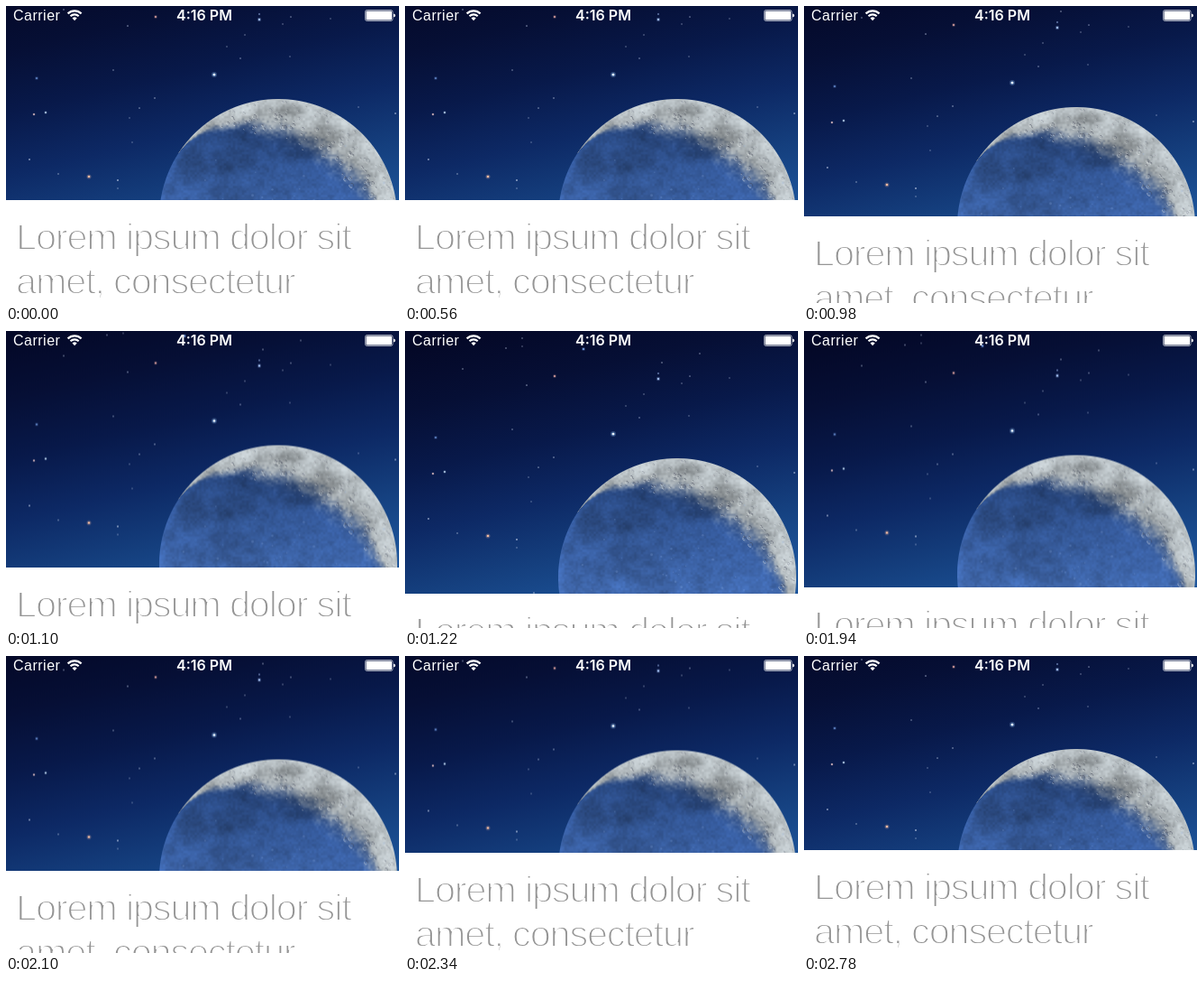
These frames come from a looping animation (436x329 px, 2800 ms). An HTML page with a canvas:

```html
<!DOCTYPE html>
<html lang="en">
<head>
<meta charset="utf-8">
<style>
html, body { margin: 0; width: 100%; height: 100%; overflow: hidden; background: #fff; }
#stage { position: relative; width: 436px; height: 329px; overflow: hidden; background: #fff; }
#header { position: absolute; left: 0; top: 0; width: 436px; overflow: hidden; }
#sky { position: absolute; left: 0; top: -60px; }
/* the white stroke thins the letters */
#text { position: absolute; left: 11px; top: 17px; font: 41.5px/48.5px "Liberation Sans", Arial, sans-serif;
  letter-spacing: -1.2px; color: #959595; -webkit-text-stroke: 1.8px #fff; white-space: pre; }
#bar { position: absolute; left: 0; top: 0; }
#bar text { font: 16px "Liberation Sans", Arial, sans-serif; letter-spacing: .5px; fill: #fff; }
#bar .time { font: 600 16px Inter, sans-serif; letter-spacing: 0; }
</style>
</head>
<body>
<div id="stage">
  <div id="header"><canvas id="sky" width="436" height="340"></canvas></div>
  <div id="text">Lorem ipsum dolor sit
amet, consectetur</div>
  <svg id="bar" width="436" height="22">
    <text x="8" y="16">Carrier</text>
    <text class="time" x="220" y="16" text-anchor="middle">4:16 PM</text>
    <g fill="none" stroke="#fff" stroke-width="2.2">
      <path d="M68.6 8.4a10.6 10.6 0 0 1 15 0M71.5 11.3a6.6 6.6 0 0 1 9.2 0"/>
      <path d="M76.1 16.2l-2.6-2.7a3.7 3.7 0 0 1 5.2 0z" fill="#fff" stroke="none"/>
      <rect x="398.5" y="4.5" width="30.5" height="12" rx="2" stroke-width="1" opacity=".6"/>
      <rect x="399.5" y="5.4" width="28.5" height="10.2" rx="1" fill="#fff" stroke="none"/>
      <path d="M430 8.5q2 .5 2 2t-2 2z" fill="#fff" stroke="none"/>
    </g>
  </svg>
</div>
<script>
const $ = id => document.getElementById(id);
const header = $('header'), sky = $('sky'), text = $('text');
const g = sky.getContext('2d');
const REST = 215, PAD = 60, PULL = 95;
const CX = 302, CY = 235 + PAD, R = 132;

let seed = 7;
const rnd = () => (seed = seed * 16807 % 2147483647) / 2147483647;
const clamp = v => Math.max(0, Math.min(1, v));
const smooth = v => (v = clamp(v), v * v * (3 - 2 * v));
const mix = (a, b, t) => a + (b - a) * t;

function hash(x, y) {
  const s = Math.sin(x * 127.1 + y * 311.7) * 43758.5453;
  return s - Math.floor(s);
}
function noise(x, y) {
  const i = Math.floor(x), j = Math.floor(y), u = smooth(x - i), v = smooth(y - j);
  return mix(mix(hash(i, j), hash(i + 1, j), u), mix(hash(i, j + 1), hash(i + 1, j + 1), u), v);
}

function dot(x, y, r, color, alpha) {
  g.globalAlpha = alpha;
  g.fillStyle = color;
  g.beginPath();
  g.arc(x, y, r, 0, 7);
  g.fill();
  g.globalAlpha = 1;
}

function drawSky() {
  const grad = g.createLinearGradient(180, 0, 256, 325);
  [[0, '#040827'], [.2, '#060f35'], [.4, '#08194a'], [.6, '#0d2965'], [.8, '#15407f'], [1, '#1d559b']]
    .forEach(stop => grad.addColorStop(...stop));
  g.fillStyle = grad;
  g.fillRect(0, 0, 436, 340);

  // faint stars as x, y pairs
  const faint = [130,-30, 130,-21, 112,-19, 64,4, 135,22, 285,-3, 316,12, 260,58, 245,45, 119,71,
    31,120, 44,118, 26,170, 58,186, 124,193, 124,202, 148,113, 140,151, 391,112, 432,119, 143,252,
    360,14, 327,-13, 137,124, 165,102, 265,32, 26,-24, 315,56, 307,20];
  for (let i = 0; i < faint.length; i += 2)
    dot(faint[i], faint[i + 1] + PAD, .65 + rnd() * .25, '#c3cee8', .5 + rnd() * .35);
  [[231, 76, 2, '#a9d2ff'], [198, -18, 1.4, '#7ea7ee'], [281, 15, 1.5, '#9fbdf0'], [281, 9, .8, '#8fa9dd'],
    [166, 12, 1.3, '#e0a3a0'], [34, 80, 1.4, '#5f83c4'], [92, 189, 1.7, '#efb9a0'],
    [31, 120, 1, '#e2b5b0'], [44, 118, 1.1, '#b9d4ee']]
    .forEach(([x, y, r, c]) => {
      dot(x, y + PAD, r * 1.5, c, .25);
      dot(x, y + PAD, r * .8, c, 1);
    });
  dot(231, 76 + PAD, 1.1, '#fff', 1);
}

// dark plains: x, y, radius x, radius y, depth
const plains = [[268, 148, 36, 11, .45], [317, 115, 15, 7, .5], [352, 146, 22, 14, .4], [382, 160, 14, 18, .25],
  [325, 157, 30, 15, .5], [250, 168, 26, 18, .6], [206, 178, 18, 22, .45], [262, 205, 40, 14, .3]];

function plainDepth(x, y) {
  let d = 0;
  for (const [px, py, rx, ry, k] of plains)
    d = Math.max(d, k * smooth(1.5 - Math.hypot((x - px) / rx, (y - PAD - py) / ry)));
  return d;
}

// distance towards the light, as a share of the disc's half chord
function lightAt(dx, dy) {
  const u = dx * .53 - dy * .85, v = dx * .85 + dy * .53;
  return u / Math.sqrt(Math.max(9, R * R - v * v));
}

function drawMoon() {
  const img = g.getImageData(0, 0, 436, 340), px = img.data;
  for (let y = CY - R - 1; y < 340; y++) for (let x = CX - R - 1; x < 436; x++) {
    const dx = x + .5 - CX, dy = y + .5 - CY, dist = Math.hypot(dx, dy);
    const cover = clamp(R - dist + .5);
    if (!cover) continue;
    const n = noise(x / 22, y / 22) * .4 + noise(x / 8, y / 8) * .3 + noise(x / 2.5, y / 2.5) * .3;
    const dark = plainDepth(x, y), s = lightAt(dx, dy) - .62 + (n - .5) * .18;
    const lit = smooth(s / .24 + .3);
    const low = clamp((y - 180) / 150), rim = smooth((dist - R + 10) / 10);
    const glow = .78 + n * .4 - dark * .28 + rim * .12;
    const gray = (190 + (n - .5) * 70 - dark * 75) * mix(.82, 1.04, clamp(s / .3));
    const shade = [mix(42, 70, low), mix(76, 112, low), mix(138, 184, low)];
    const o = (y * 436 + x) * 4;
    [.96, 1, 1.02].forEach((tint, c) => {
      px[o + c] = mix(px[o + c], mix(shade[c] * glow, gray * tint, lit), cover);
    });
  }
  g.putImageData(img, 0, 0);
}

function drawCraters() {
  g.save();
  g.beginPath();
  g.arc(CX, CY, R - 1, 0, 7);
  g.clip();
  for (let i = 0; i < 900; i++) {
    const a = rnd() * 7, d = Math.sqrt(rnd()) * R, dx = Math.cos(a) * d, dy = Math.sin(a) * d;
    const r = .6 + 2 * rnd() ** 3, s = lightAt(dx, dy), x = CX + dx, y = CY + dy;
    if (s < .6 || plainDepth(x, y) > .4 && r > 1.2) continue;
    const edge = s < .82 ? .5 : .25;
    g.lineWidth = .9;
    g.strokeStyle = `rgba(62,68,84,${edge})`;
    g.beginPath();
    g.arc(x, y, r, -1.9, .4);
    g.stroke();
    g.strokeStyle = `rgba(236,238,238,${edge})`;
    g.beginPath();
    g.arc(x, y, r, 1.2, 3.5);
    g.stroke();
  }
  for (let i = 0; i < 60; i++) {
    const a = rnd() * 7, d = rnd() * R;
    dot(CX + Math.cos(a) * d, CY + Math.sin(a) * d, .5 + rnd(), '#9dbbe8', .2);
  }
  g.restore();
}

drawSky();
drawMoon();
drawCraters();

// drag down, hold, then a critically damped spring back
function stretch(t) {
  if (t < 1844) return PULL * smooth((t - 826) / 553);
  const k = (t - 1844) * .0106;
  return PULL * (1 + k) * Math.exp(-k);
}

function frame() {
  const s = Math.round(stretch(performance.now() % 2800) * 2) / 2;
  header.style.height = REST + s + 'px';
  sky.style.transform = `translateY(${s / 2}px)`;
  text.style.transform = `translateY(${REST + s}px)`;
  requestAnimationFrame(frame);
}
frame();
</script>
</body>
</html>
```
